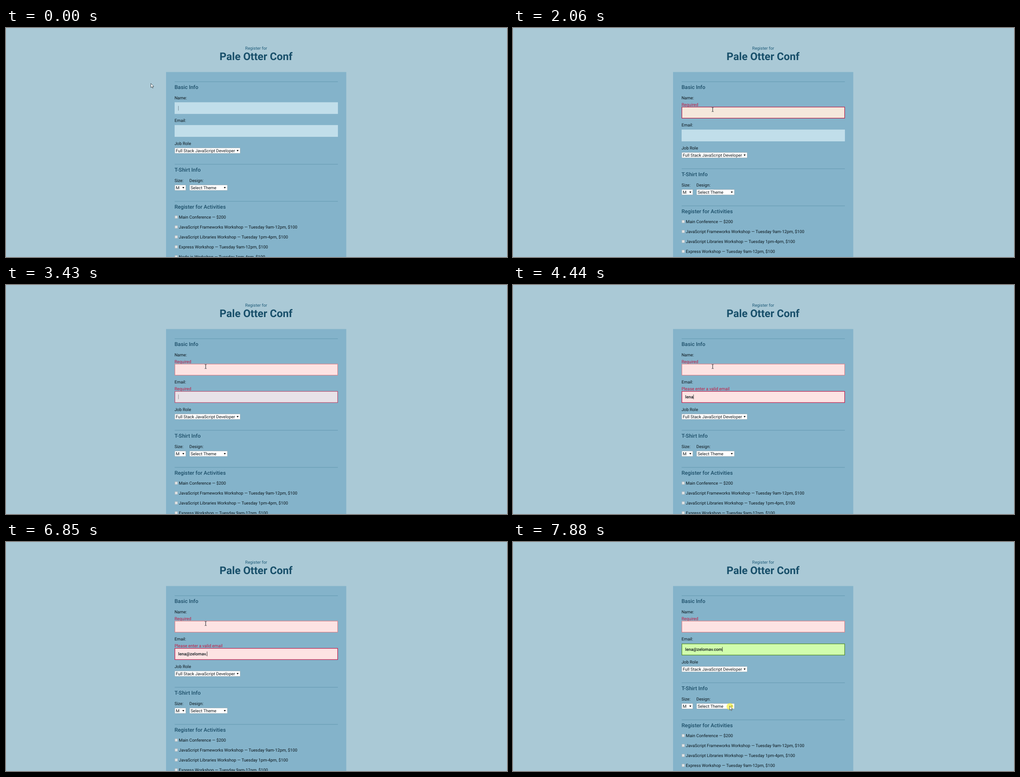
An HTML page that plays this animation: 1105x507 px, repeating every 8 s.

```html
<!DOCTYPE html>
<html lang="en">
<head>
<meta charset="utf-8">
<title>Registration form</title>
<style>
  html, body { margin: 0; width: 100%; height: 100%; overflow: hidden; background: #aac9d6; }
  svg { display: block; }
  text { font: 9.37px Roboto, sans-serif; fill: #0c161c; text-rendering: geometricPrecision; }
  .title { font-size: 23.36px; font-weight: 700; fill: #184f6a; text-anchor: middle; }
  .intro { fill: #1d5a78; text-anchor: middle; }
  .legend { font-size: 11.7px; font-weight: 500; fill: #1c4e68; }
  .error { fill: #c4163f; }
  .typed { font-weight: 500; }
  .rule { fill: #699db5; }
  .select { fill: #fff; stroke: #9aa9b0; stroke-width: .7; }
  .check { fill: #dde2e4; stroke: #a5afb4; stroke-width: .6; }
  .field { stroke-width: 1.2; }
</style>
</head>
<body>
<svg width="1105" height="507" viewBox="0 0 1105 507">
  <rect x="353" y="97.5" width="397.5" height="420" fill="#84b3ca"/>
  <text class="intro" x="551.8" y="48">Register for</text>
  <text class="title" x="551.5" y="71">Pale Otter Conf</text>
  <rect class="rule" x="372" y="118.3" width="360" height="1.2"/>
  <text class="legend" x="371.7" y="135.2">Basic Info</text>
  <text x="371.7" y="158.1">Name:</text>
  <text class="error" id="nameError" x="371.7" y="172.7"></text>
  <g id="upper">
    <rect class="field" id="nameBox" x="372.5" y="165" width="359" height="24.6"/>
    <rect id="icon" x="715.7" y="174" width="6.6" height="8" rx="1" fill="#464d52"/>
    <rect id="nameCaret" x="379.8" y="172.5" width=".9" height="10.3"/>
    <text x="371.7" y="208.2">Email:</text>
    <text class="error" id="emailError" x="371.7" y="222.7"></text>
  </g>
  <g id="lower">
    <rect class="field" id="emailBox" x="372.5" y="215.5" width="359" height="24.8"/>
    <text class="typed" id="email" x="379.8" y="230.6"></text>
    <rect id="emailCaret" y="222.5" width=".9" height="10.3"/>
  </g>
  <g id="ring"><circle r="7.5" fill="#f4ef3e" opacity=".7"/></g>
  <path id="arrow" d="M0 0V9.2L2.1 7.3L3.6 10.4L5 9.8L3.6 6.8H6.5Z" fill="#fff" stroke="#26343c" stroke-width=".8"/>
  <path id="beam" d="M-2-4.5H-.6L0-4L.6-4.5H2M0-4V4M-2 4.5H-.6L0 4L.6 4.5H2" fill="none" stroke="#1c262c" stroke-width="1"/>
</svg>
<script>
const $ = id => document.getElementById(id);
const label = (x, y, s, cls = "") => `<text class="${cls}" x="${x}" y="${y}">${s}</text>`;
const section = (y, s) =>
  `<rect class="rule" x="372" y="${y}" width="360" height="1.2"/>` + label(371.7, y + 17, s, "legend");
const select = (x, y, w, s) =>
  `<rect class="select" x="${x}" y="${y}" width="${w}" height="11.7"/>` + label(x + 2.3, y + 9.2, s) +
  `<path d="M${x + w - 7.8} ${y + 4.3}h4.4l-2.2 3.6z" fill="#111"/>`;

const activities = [
  "Main Conference — $200",
  "JavaScript Frameworks Workshop — Tuesday 9am-12pm, $100",
  "JavaScript Libraries Workshop — Tuesday 1pm-4pm, $100",
  "Express Workshop — Tuesday 9am-12pm, $100",
  "Node.js Workshop — Tuesday 1pm-4pm, $100"
];

$("lower").insertAdjacentHTML("beforeend",
  label(371.7, 258.9, "Job Role") + select(372.2, 265.7, 144.3, "Full Stack JavaScript Developer") +
  section(301, "T-Shirt Info") +
  label(371.7, 341, "Size:") + label(404.5, 341, "Design:") +
  select(372.2, 347.7, 24.5, "M") + select(405, 347.7, 83.2, "Select Theme") +
  section(383.2, "Register for Activities") +
  activities.map((s, i) =>
    `<rect class="check" x="372.4" y="${415.6 + 22 * i}" width="6" height="6"/>` +
    label(381.3, 422.4 + 22 * i, s)).join(""));

// Field looks: [fill, border]
const idle = ["#c1deea", "#c1deea"], focus = ["#fff", "#5d95ae"];
const wrong = ["#fde3e3", "#c21848"], wrongBlur = ["#fde3e3", "#dd8188"];
const address = "lena@zelomav.com";

// Each step changes only the listed properties, at the given time.
const steps = [
  [0, { name: idle, email: idle, nameError: "", emailError: "", typed: 0, icon: 0,
        nameCaret: "#667f8b", emailCaret: "", arrow: [319.5, 122.7], beam: null, ring: 0 }],
  [330, { name: focus, icon: 1, nameCaret: "#333", arrow: null, beam: [441, 179.5] }],
  [700, { nameCaret: "", beam: [440.4, 179.5] }],
  [1020, { nameCaret: "#333" }],
  [1370, { beam: [440.4, 180.5] }],
  [1710, { nameCaret: "" }],
  [2060, { name: ["#f5e8dc", "#b81c45"], nameError: "Required", icon: 0 }],
  [2410, { name: wrong, nameCaret: "#333" }],
  [2750, { nameCaret: "" }],
  [3100, { nameCaret: "#333" }],
  [3430, { name: wrongBlur, nameCaret: "", email: ["#e8e2e8", "#b94a6c"],
           emailError: "Required", emailCaret: "#8a868c" }],
  [3770, { email: wrong, emailError: "Please enter a valid email", emailCaret: "#222", typed: 1 }],
  [4090, { typed: 3 }],
  [4440, { typed: 4 }],
  [4800, { typed: 5 }],
  [5130, { typed: 6 }],
  [5480, { typed: 7 }],
  [5830, { typed: 9 }],
  [6160, { typed: 10 }],
  [6510, { typed: 12 }],
  [6850, { typed: 13 }],
  [7200, { typed: 15, emailError: "", email: ["#e3f2c2", "#7e6a35"] }],
  [7540, { typed: 16, email: ["#d1fdad", "#4f8a2b"] }],
  [7880, { beam: null, arrow: [477.8, 363], ring: 1 }]
];

const show = (id, on) => $(id).style.display = on ? "" : "none";
const move = (id, p) => { show(id, p); if (p) $(id).setAttribute("transform", `translate(${p})`); };
const paint = (id, [fill, stroke]) => { $(id).style.fill = fill; $(id).style.stroke = stroke; };
const caret = (id, color) => { show(id, color); $(id).style.fill = color; };

function draw(t) {
  const s = Object.assign({}, ...steps.filter(k => k[0] <= t).map(k => k[1]));
  const shift = s.nameError ? 10 : 0;
  move("upper", [0, shift]);
  move("lower", [0, shift + (s.emailError ? 10 : 0)]);
  paint("nameBox", s.name);
  paint("emailBox", s.email);
  $("nameError").textContent = s.nameError;
  $("emailError").textContent = s.emailError;
  $("email").textContent = address.slice(0, s.typed);
  $("emailCaret").setAttribute("x", 379.9 + (s.typed ? $("email").getComputedTextLength() : 0));
  caret("nameCaret", s.nameCaret);
  caret("emailCaret", s.emailCaret);
  show("icon", s.icon);
  move("arrow", s.arrow);
  move("beam", s.beam);
  move("ring", s.ring ? [478.3, 364.3] : null);
}

let start;
function tick(now) {
  start ??= now;
  draw((now - start) % 8000);
  requestAnimationFrame(tick);
}
draw(0);
requestAnimationFrame(tick);
</script>
</body>
</html>
```
